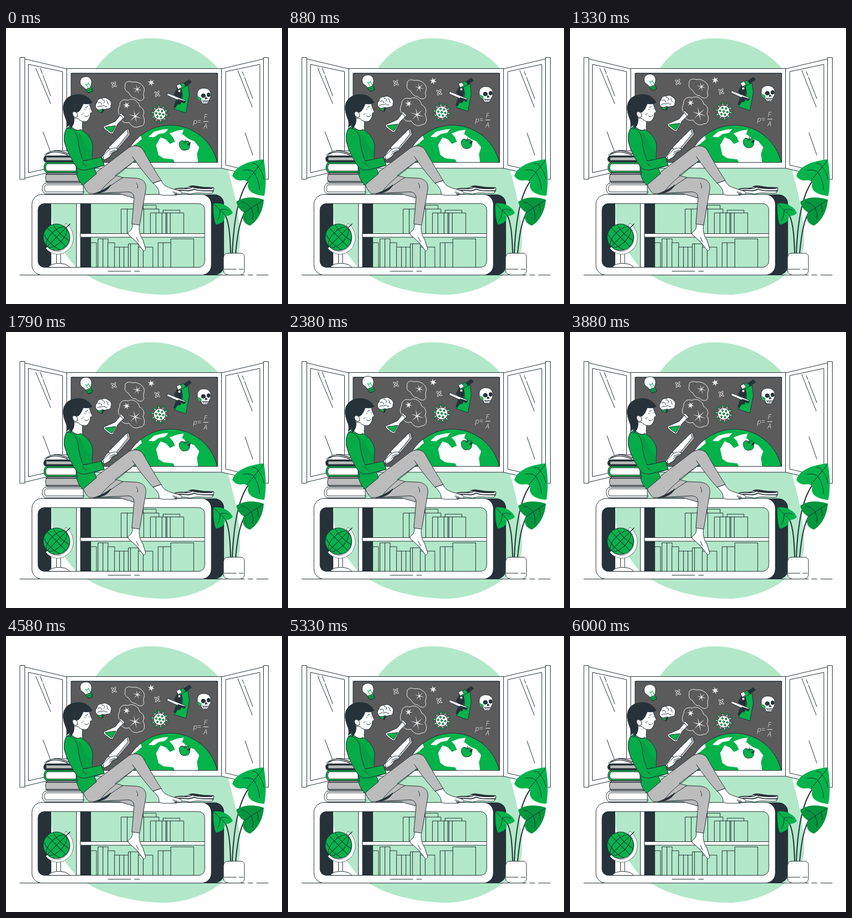
An HTML page that plays this animation: 500 px wide and 500 px high, repeating every 6.04 s.

```html
<!DOCTYPE html>
<html lang="en">
<head>
<meta charset="utf-8">
<title>Reading by the window</title>
<style>
  html, body { margin: 0; width: 100%; height: 100%; overflow: hidden; background: #fff; }
  svg { display: block; width: 100vw; height: 100vh; }
  .l { fill: none; stroke: #263238; stroke-width: 1; stroke-linecap: round; stroke-linejoin: round; }
  .w { fill: #fff; } .g { fill: #04b34a; } .s { fill: #05ab48; } .d { fill: #263238; }
  .p { fill: #bcbcbc; } .b { fill: #b2e8c9; }
  .o { fill: none; stroke: #f2f2f2; stroke-width: 1; }
  .n { stroke: none; }
  text { font: italic 300 13px "Open Sans", "Noto Sans", sans-serif; fill: #f2f2f2; }
</style>
</head>
<body>
<svg viewBox="0 0 500 500">
  <defs>
    <clipPath id="pane"><rect x="118.500" y="82" width="265" height="161.500"/></clipPath>
    <clipPath id="earth"><circle cx="298" cy="263" r="87"/></clipPath>
    <clipPath id="opening"><rect x="58" y="318" width="302" height="115.500" rx="11"/></clipPath>
    <clipPath id="ball"><circle cx="91.500" cy="379" r="24"/></clipPath>
  </defs>

  <path class="b" d="M262 18.500C312 18.500 358 42 385 74C396 120 386 165 397 232C403 268 424 318 424 388C424 441 350 483 288 483C236 483 174 470 133 439C108 416 90 384 83 345C81 318 86 280 115 220C130 170 140 105 162 74C188 36 225 18.500 262 18.500Z"/>

  <!-- window -->
  <g class="l">
    <path class="w" d="M110 73.500H391V254H110Z"/>
    <path style="fill:#5b5b5b" d="M118.500 82H383.500V243.500H118.500Z"/>
    <g id="sash">
      <path class="w" d="M34 56L110 74V254L34 272Z"/>
      <path class="w" d="M41 66L102.500 79V248.500L41 262Z"/>
      <path class="w" d="M25.500 53.500H34V274H25.500Z"/>
    </g>
    <use href="#sash" transform="matrix(-1 0 0 1 500.500 0)"/>
    <path d="M54 73L81 137M62 73L66 83M67 86L81 123M67 188L82 228M420 77L446 143M428 79L431 86M432 89L447 128M433 190L447 230"/>
  </g>
  <g clip-path="url(#pane)">
    <g clip-path="url(#earth)">
      <circle class="g" cx="298" cy="263" r="87"/>
      <path class="w" d="M221 216L233 203L244 195L246 201L237 209L228 215ZM258 197L268 188L283 184L294 183L288 190L277 192L268 198ZM272 212L280 198L290 202L297 210L306 206L302 197L296 191L310 186L322 184L319 192L331 201L341 205L350 216L346 228L348 244H306L303 238L285 236L276 230Z"/>
    </g>
    <circle class="l" cx="298" cy="263" r="87"/>
  </g>
  <path class="l" d="M118.500 82H383.500V243.500H118.500Z"/>

  <g id="float">
    <!-- bulb -->
    <g class="l">
      <path class="w" d="M134.500 100C133 92 139 88 145 88C152 88 156 94 155 100C155 104 153 105 154 108L144 111.500C142 106 135 106 134.500 100Z"/>
      <path class="g" d="M144 111.500L154.500 107.500L157 114L153.500 117.500L149 117.500Z"/>
      <path d="M146 114L156 111M148 117L157 114"/>
      <path style="stroke:#04b34a" d="M149 109L144 101L148 103L149 99L153 107"/>
    </g>
    <!-- brain -->
    <g class="l">
      <path class="g" d="M166 147L179 146L174 154L167 151Z"/>
      <path class="d" d="M174 149L179 146L174 154Z"/>
      <path class="w" d="M164 146C160 142 163 136 165 135C165 129 171 127 174 128C178 125 183 127 185 129C190 131 192 137 190 140C191 145 186 147 183 146C179 149 176 146 174 147C170 149 166 149 164 146Z"/>
      <path d="M167 136C171 133 174 136 173 139M174 130C179 130 180 134 177 136M182 131C185 133 182 137 186 138M166 143C170 140 173 143 175 141C179 139 179 144 183 142"/>
    </g>
    <!-- galaxies and atoms -->
    <g class="o">
      <path d="M216 105C214 98 222 95 229 98C237 96 247 101 250 109C252 115 247 118 250 126C248 134 239 132 235 127C228 127 225 122 222 117C217 115 214 110 216 105Z"/>
      <path d="M206 141C205 132 214 128 221 131C229 126 240 132 242 142C249 145 252 153 248 159C253 167 251 179 242 178C234 183 226 177 223 171C214 174 207 168 208 160C203 155 202 148 206 141Z"/>
      <g id="atom" stroke-width=".8">
        <ellipse cx="195.500" cy="102.500" rx="6" ry="1.800" transform="rotate(38 195.500 102.500)"/>
        <ellipse cx="195.500" cy="102.500" rx="6" ry="1.800" transform="rotate(-60 195.500 102.500)"/>
      </g>
      <use href="#atom" transform="translate(78.500 17)"/>
    </g>
    <g id="stars" style="fill:#f2f2f2"></g>
    <!-- flask -->
    <g class="l">
      <path class="w" d="M207 158L198 169L177.500 178C176 180 178 183 181 185L189 191C192 192 194 191 195 188L203 173L213 163Z"/>
      <path class="g" d="M180 179.500L199 177L193 188C192 190 190 189 189 188L181 182Z"/>
      <path class="w" d="M206 156L208 154.500L215 161L213 164Z"/>
    </g>
    <!-- microscope -->
    <g class="l">
      <path class="d" d="M311 109L320 112L314 146L304 143L310 126L305 120Z"/>
      <path class="g" d="M318 108L330 104L332 122L326 154L305 147L311 138L316 138L320 124Z"/>
      <path class="d" d="M321 101L332 93.500L336 98L325 106Z"/>
      <path class="g" d="M310 105L321 99L326 105L315 112Z"/>
      <path class="w" d="M309 104L315 101L319 107L312 111Z"/>
      <circle class="w" cx="314" cy="114" r="2.500"/>
      <path class="w" d="M293 118L325 131L323 136L292 122Z"/>
      <path class="d" d="M312 129L325 133L323 136L311 131Z"/>
    </g>
    <!-- skull -->
    <g class="l">
      <path class="w" d="M346.500 120C346 112 353 108.500 359 109C367 109 372 115 371 122C371 127 369 128 368 131L365 137.500L356 137L353 132C348 130 346 126 346.500 120Z"/>
      <path class="g n" d="M347 123C348 128 351 131 354 132L354 127Z"/>
      <ellipse class="d" cx="357.500" cy="122.500" rx="3.800" ry="3.500"/>
      <ellipse class="d" cx="367" cy="121" rx="3" ry="3.500"/>
      <path class="d" d="M362 125L360.500 128.500L364.500 128Z"/>
      <path d="M355 132H367M358 132V135M361 132V136M364 132V136"/>
    </g>
    <g id="virus" class="l"></g>
    <text x="339" y="174">p=</text><text x="358" y="165.500">F</text><text x="358" y="182.500">A</text>
    <path class="o" d="M357.500 169.500H366.500"/>
    <!-- apple -->
    <g class="l">
      <path class="g" d="M324 206C318 201 313 206 314 212C315 219 320 223 325 221C330 222 333 217 333 213L329 211L332 207C330 204 327 204 324 206Z"/>
      <path class="d" d="M329 211L334 207L333 212Z"/>
      <path d="M321 207C323 209 326 208 327 206M324 207L325 202"/>
    </g>
  </g>

  <!-- cabinet -->
  <path class="l" d="M25 447.500H432M438 447.500H447M454 447.500H475"/>
  <path class="d" d="M354 301.500H378A17 17 0 0 1 395 318V430A17 17 0 0 1 378 447.500H354V437H364V312H354Z"/>
  <g clip-path="url(#opening)">
    <path class="d" d="M58 318H82V434H58ZM135 318H154V434H135Z"/>
    <path class="l w" d="M128 316H135V436H128Z"/>
    <g class="l b" id="books"></g>
    <path class="l w" d="M135 372.500H362V379H135Z"/>
  </g>
  <path class="l w" fill-rule="evenodd" d="M65 301.500H354A18 18 0 0 1 372 319.500V429.500A18 18 0 0 1 354 447.500H65A18 18 0 0 1 47 429.500V319.500A18 18 0 0 1 65 301.500ZM69 318A11 11 0 0 0 58 329V422.500A11 11 0 0 0 69 433.500H349A11 11 0 0 0 360 422.500V329A11 11 0 0 0 349 318Z"/>
  <path class="l" d="M185 440.500H226M233 440.500H242"/>

  <!-- globe -->
  <g class="l">
    <path class="w" d="M92 408H99V428H92Z"/>
    <path class="w" d="M77 433.500C80 424 111 424 115 433.500Z"/>
    <path class="w" stroke-width=".6" d="M109 354C130 369 126 408 93 410C83 409 76 404 72 399L75 396C82 403 90 406 98 404C119 397 121 372 106 358Z"/>
    <path d="M116 355L68 402" stroke-width="1.500"/>
    <circle class="g" cx="91.500" cy="379" r="24"/>
    <g clip-path="url(#ball)" transform="rotate(45 91.500 379)">
      <ellipse cx="91.500" cy="379" rx="11" ry="24"/>
      <path d="M91.500 355V403M66 379H117M70 367Q91 373 113 367M70 391Q91 398 113 391"/>
    </g>
  </g>

  <!-- stacked volumes and magazine -->
  <g class="l">
    <path class="w" d="M70 230C80 221 92 220 117 224V232H72Z"/>
    <path d="M73 229C84 223 93 223 112 230M88 222C98 222 106 225 116 229" stroke-width="1.500"/>
    <path class="d" d="M72 231.500H122V243H72C67 241 67 234 72 231.500Z"/>
    <path class="p" d="M73 234H122V240H73Z"/>
    <path class="g" d="M74 243H128V262H74C67 260 67 245 74 243Z"/>
    <path class="w" d="M75 246H128V259H75C71 256 71 249 75 246Z"/>
    <path class="p" d="M76 262.500H134V280.500H76C70 278 70 265 76 262.500Z"/>
    <path d="M72 265H130M72 278H134" stroke-width="1.500"/>
    <path class="w" d="M71 281H140V300.500H71C64 297 64 284 71 281Z"/>
    <path d="M140 284H72C69 287 69 294 72 297H142"/>
    <path class="w" d="M303 293C315 287 322 294 336 286C350 291 362 287 377 290L374 299C355 300 345 297 334 301C321 297 312 301 304 298Z"/>
    <path class="d" d="M332 287C342 283 350 290 376 289L373 291C355 292 345 291 332 287Z"/>
    <path d="M304 296C320 290 326 299 341 292C352 297 362 294 376 295M306 292C320 288 327 294 336 289" stroke-width="1.800"/>
  </g>

  <!-- reader -->
  <g class="l">
    <path class="w" d="M267 281L281 276C284 284 290 288 301 291L317 296C320 299 318 301 314 301L304 300L309 303H295C286 303 279 304 277 299C278 293 273 288 267 281Z"/>
    <path class="w" d="M229 354H242C240 367 242 374 248 384L253 400C252 404 249 405 247 401L238 389L227 379C220 375 220 371 224 368C228 366 229 362 229 354Z"/>
    <path d="M236 379L240 387M302 297L310 299"/>
    <path class="p" d="M138 279L163 262L222 217C233 211 244 213 249 222C258 238 270 259 281 276L266 281C255 268 244 255 234 240L198 267L212 271L236 272C250 274 255 281 253 294L242 357L228 355L232 308L204 300H151C145 296 141 287 138 279Z"/>
    <path d="M234 240L206 263C190 275 177 287 169 299M212 271C196 280 184 291 170 299M232 308C232 299 226 296 216 297L160 300M234 240L229 233M236 281C239 285 239 287 238 290"/>
    <path class="d" d="M160 300C174 295 182 290 190 284C186 292 178 299 160 300Z"/>

    <path class="w" d="M173 234L184 219L191 216L202 218L203 222L195 225L189 233L178 239Z"/>
    <path class="w" d="M186 216L219 183L222 182L225 193L201 221L191 223Z"/>
    <path class="p" d="M219 183L222 182L225 193L203 219L200 218L221 192Z"/>
    <path class="w" d="M176 231L188 220C194 216 203 217 202 221L194 225L187 234L178 239Z"/>
    <path d="M188 225L198 221M187 229L194 225"/>

    <path class="w" d="M121 160L139 166L138 180C140 184 138 189 133 188C126 188 119 183 115 178Z"/>
    <path class="s" d="M117 177C121 183 129 188 136 184C146 190 153 198 156 208C159 217 154 226 157 239L173 234L178 249L160 254L164 264L139 285C132 278 126 267 127 251C119 237 110 222 106 207C104 194 107 181 117 177Z"/>
    <path class="n" style="fill:#05a144" d="M119 185C131 194 129 213 138 238L156 239L153 220C143 217 143 201 134 193Z"/>
    <path class="s" d="M110 182C124 180 130 194 131 207C133 222 136 232 140 241L173 234L178 249L145 257C133 259 128 253 124 246C116 233 109 220 106 205C105 195 106 186 110 182Z"/>
    <path d="M140 241L148 239M138 244L145 250M128 253L130 264M117 177C122 183 128 188 136 184"/>

    <path class="w" d="M124 134L149 130C151 138 152 142 155 149C157 152 156 153 153 154C153 159 151 166 146 169C140 171 134 168 130 164L122 163Z"/>
    <path class="d" d="M104 148C102 132 113 122 126 121C140 119 150 124 156 135C151 138 146 138 140 137C136 147 133 152 128 153C122 149 119 153 122 159C125 166 123 176 117 182C116 178 116 177 116 175L110 179C113 168 105 163 104 148Z"/>
    <path class="w" d="M129 155C125 149 119 151 121 157C122 161 126 163 129 161Z"/>
    <path d="M143 147V148M144 144L148 142M142 159C145 162 148 161 150 158M139 155H140M137 157H138M151 146V147"/>
  </g>

  <!-- plant -->
  <g class="l">
    <path stroke-width="2" d="M410 408C412 360 419 300 442 274M407 408C406 375 404 346 394 334M416 408C419 375 424 340 440 323"/>
    <path class="w" d="M402 408H425C430 408 432 411 432 416V438C432 445 428 447.500 422 447.500H405C398 447.500 394 444 394 438V416C395 411 397 408 402 408Z"/>
    <path d="M395 437H417M422 437H430"/>
    <g class="n">
      <path class="g" d="M410 268C416 249 440 241 467 238C471 260 472 285 468 304C452 303 438 297 438 285C441 278 435 275 427 276C420 277 414 274 410 268Z"/>
      <path style="fill:#04963f" d="M417 315C430 305 450 305 467 311C466 331 456 350 442 358C431 355 426 345 431 334C424 330 418 322 417 315Z"/>
      <path class="g" d="M376 318C390 316 405 322 411 335C406 340 400 342 396 339C398 349 390 355 380 356C376 345 375 330 376 318Z"/>
    </g>
    <path d="M437 276C447 264 457 252 467 239M449 261C443 257 436 256 430 258M457 252C455 247 451 245 446 245M449 262C455 270 459 281 459 293M457 252C463 258 466 266 467 274M432 334C443 327 455 319 466 312M444 326C439 320 433 316 427 315M444 326C448 334 448 340 447 347M455 319C457 325 457 330 457 334M397 339L377 319M388 330C394 327 399 328 404 331M388 330C388 338 386 344 383 349"/>
  </g>
</svg>
<script>
  const LOOP = 6040, RISE = 10;
  const $ = id => document.getElementById(id);
  const repeat = (count, make) => Array.from({ length: count }, (_, i) => make(i));

  const star = (cx, cy, outer, inner, turn) => {
    const points = repeat(12, i => {
      const r = i % 2 ? inner : outer, a = turn + i * Math.PI / 6;
      return [cx + r * Math.cos(a), cy + r * Math.sin(a)].map(v => v.toFixed(2)).join();
    });
    return `<polygon points="${points.join(" ")}"/>`;
  };
  $("stars").innerHTML = star(238, 111, 9, 1.3, .25) + star(234, 160, 13, 1.6, .3) +
    star(218.5, 140, 6.5, 2.2, .2) + star(263, 99, 6.5, 2.4, .3);

  const ring = (count, shape) =>
    repeat(count, i => `<g transform="rotate(${i * 360 / count + 10})">${shape}</g>`).join("");
  $("virus").setAttribute("transform", "translate(278.5 155.5)");
  $("virus").innerHTML =
    ring(10, '<path d="M10 0H14" style="stroke:#f2f2f2;stroke-width:1.5"/><rect class="g" x="14" y="-2.3" width="2.6" height="4.6" rx="1" stroke-width=".6"/>') +
    '<circle class="w" r="11"/><circle class="g" r="2" stroke-width=".5"/>' +
    ring(6, '<circle class="g" cx="6.5" r="1.8" stroke-width=".5"/>');

  // each volume: left, top, width
  const shelf = (bottom, volumes) => volumes.map(([x, y, w]) =>
    `<rect class="b" x="${x}" y="${y}" width="${w}" height="${bottom - y}"/>`).join("");
  $("books").innerHTML =
    shelf(372.5, [[249, 321, 23], [209, 328, 11], [220, 328, 30], [250, 328, 27], [262, 335, 10],
      [272, 335, 11], [285, 330, 30], [283, 335, 7], [290, 335, 2], [292, 335, 6], [298, 335, 24]]) +
    shelf(433.5, [[154, 389, 10], [167, 382, 9], [176, 382, 9], [185, 389, 12], [197, 397, 9], [206, 397, 8],
      [214, 397, 8], [222, 391, 4], [226, 391, 14], [240, 397, 9], [249, 397, 17], [276, 389, 9], [285, 389, 14], [299, 382, 41]]);

  const start = performance.now();
  function draw() {
    const phase = (performance.now() - start) % LOOP / LOOP;
    const lift = RISE * (1 - Math.abs(1 - 2 * phase));
    $("float").setAttribute("transform", `translate(0 ${(-lift).toFixed(3)})`);
    requestAnimationFrame(draw);
  }
  draw();
</script>
</body>
</html>
```
